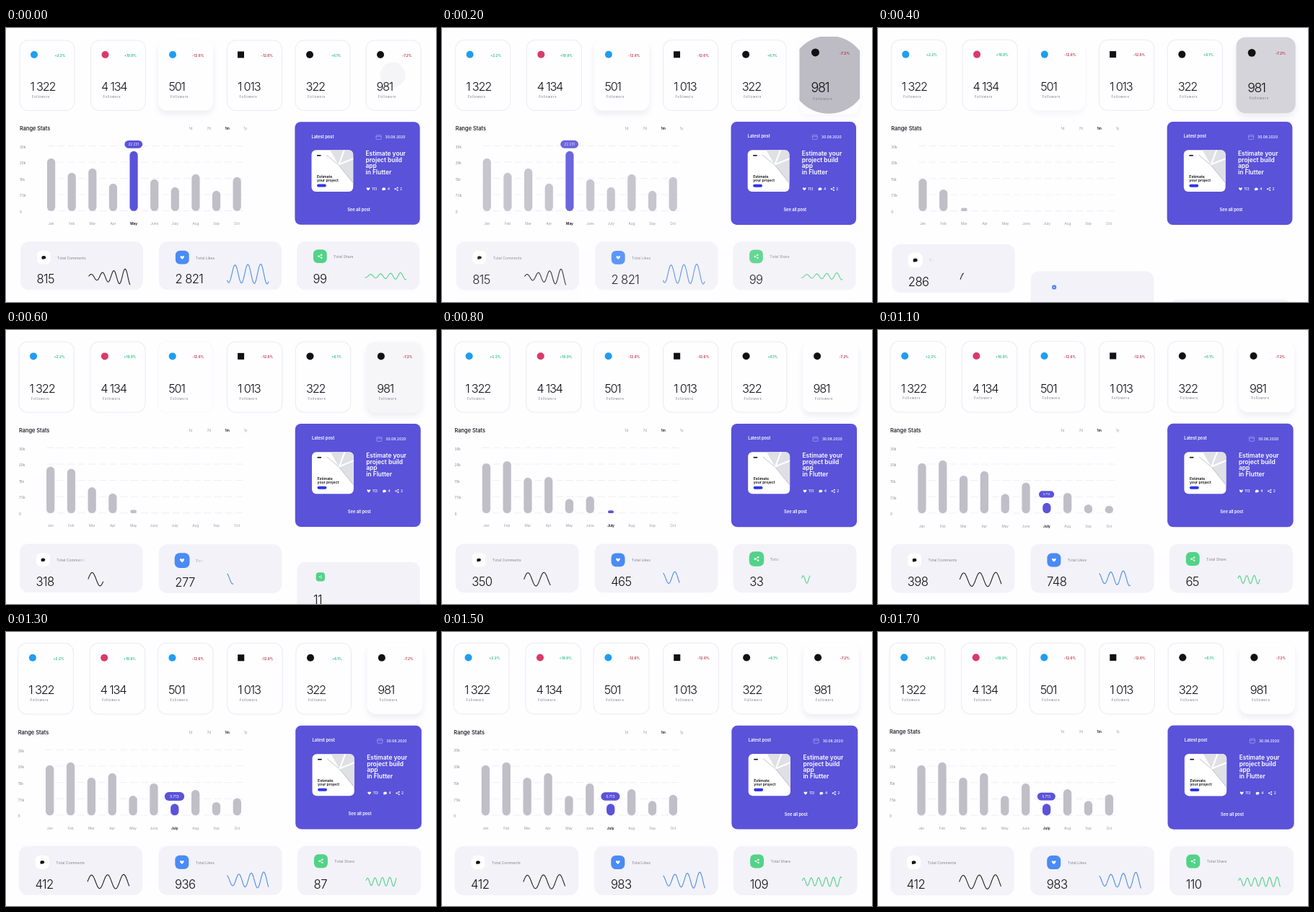
Recreate the animation shown at these times as an HTML page with a canvas. Size 596 px wide and 380 px high, loop 1800 ms.

```html
<!DOCTYPE html>
<html lang="en">
<head>
<meta charset="utf-8">
<title>Dashboard</title>
<style>
html, body { margin: 0; width: 100%; height: 100%; overflow: hidden; background: #fefdff; }
canvas { display: block; width: 596px; height: 380px; }
</style>
</head>
<body>
<canvas id="stage"></canvas>
<script>
const canvas = document.getElementById('stage');
const ctx = canvas.getContext('2d');
const dpr = window.devicePixelRatio || 1;
canvas.width = 596 * dpr;
canvas.height = 380 * dpr;

const LOOP = 1800, STEP = 100;
const BG = '#fefdff', VIOLET = '#5a52d9', GREY = '#9b9aa3', INK = '#111114';
const GREEN = '#1fbf75', RED = '#b3313a', BLUE = '#1f9df0';
const MONTHS = ['Jan', 'Feb', 'Mar', 'Apr', 'May', 'June', 'July', 'Aug', 'Sep', 'Oct'];

const CARDS = [
  { x: 19, value: '1 322', change: '+2.2%', color: BLUE },
  { x: 117.5, value: '4 134', change: '+19.9%', color: '#d93a6a' },
  { x: 211, value: '501', change: '-12.6%', color: BLUE },
  { x: 306.5, value: '1 013', change: '-12.6%', color: INK, square: true },
  { x: 401, value: '322', change: '+6.1%', color: INK },
  { x: 499, value: '981', change: '-7.2%', color: INK },
];

// Sparklines are sine waves whose amplitude grows from left to right.
const wave = (cycles, phase, mid, amp, growth) => u =>
  mid - (amp + growth * u) * Math.sin(2 * Math.PI * (cycles * u + phase));

const BEFORE = {
  active: 4, tip: '22 231', tipY: 161.3,
  bars: [73, 53, 59, 38, 83, 44, 33, 51, 28, 47],
  waves: [wave(3.7, 0.03, 49, 3, 9), wave(3.27, -0.37, 45, 12, 2), wave(4.2, -0.32, 48, 2, 3)],
};
const AFTER = {
  active: 6, tip: '5.713', tipY: 227.7,
  bars: [69, 73, 52, 58, 27, 44, 16, 36, 20, 29],
  waves: [wave(2.63, 0, 49, 9, 1), wave(3.4, 0.31, 47, 7, 5), wave(5.7, 0.05, 49, 5, 2)],
};
const PANELS = [
  { x: 20, label: 'Total Comments', color: '#fff', stroke: '#222', icon: bubble, iconColor: INK,
    dy: 0, before: '815', total: 412, rate: 0.16, done: 1187 },
  { x: 212, label: 'Total Likes', color: '#4a8bf5', stroke: '#4a8fe8', icon: heart, iconColor: '#fff',
    dy: 0, before: '2 821', total: 983, rate: 0.942, done: 1349.5 },
  { x: 403, label: 'Total Share', color: '#52d388', stroke: '#52d388', icon: share, iconColor: '#fff',
    dy: -1.5, before: '99', total: 110, rate: 0.1085, done: 1512 },
];

const ramp = (t, from, to) => Math.max(0, Math.min(1, (t - from) / (to - from)));
const easeOut = u => 1 - (1 - u) ** 3;
const easeOutBack = u => 1 + 2.7 * (u - 1) ** 3 + 1.7 * (u - 1) ** 2;

function group(alpha, draw) {
  if (alpha <= 0) return;
  ctx.save();
  ctx.globalAlpha *= alpha;
  draw();
  ctx.restore();
}

function scaled(x, y, s, draw) {
  if (s <= 0) return;
  ctx.save();
  ctx.translate(x, y);
  ctx.scale(s, s);
  ctx.translate(-x, -y);
  draw();
  ctx.restore();
}

function box(x, y, w, h, r, color) {
  ctx.beginPath();
  ctx.roundRect(x, y, w, h, Math.min(r, w / 2, h / 2));
  if (color) { ctx.fillStyle = color; ctx.fill(); }
}

function disc(x, y, r, color) {
  ctx.beginPath();
  ctx.arc(x, y, r, 0, 7);
  ctx.fillStyle = color;
  ctx.fill();
}

function stroke(color, width) {
  ctx.strokeStyle = color;
  ctx.lineWidth = width;
  ctx.stroke();
}

function line(points, color, width) {
  ctx.beginPath();
  for (let i = 0; i < points.length; i += 2) ctx.lineTo(points[i], points[i + 1]);
  stroke(color, width);
}

function text(s, x, y, size, color, weight = 400, align = 'left', spacing = 0) {
  ctx.font = `${weight} ${size}px Inter, sans-serif`;
  ctx.letterSpacing = spacing + 'px';
  ctx.textAlign = align;
  ctx.fillStyle = color;
  ctx.fillText(s, x, y);
}

function heart(x, y, color) {
  ctx.beginPath();
  ctx.moveTo(x, y + 2.5);
  ctx.bezierCurveTo(x - 5, y - 1, x - 2, y - 4, x, y - 1.2);
  ctx.bezierCurveTo(x + 2, y - 4, x + 5, y - 1, x, y + 2.5);
  ctx.fillStyle = color;
  ctx.fill();
}

function bubble(x, y, color) {
  ctx.beginPath();
  ctx.ellipse(x, y, 2.8, 2.2, 0, 0, 7);
  ctx.fillStyle = color;
  ctx.fill();
  ctx.fillRect(x - 2.5, y + 0.8, 1.7, 1.6);
}

function share(x, y, color) {
  line([x + 2, y - 2, x - 2, y, x + 2, y + 2], color, 0.7);
  for (const [dx, dy] of [[2, -2], [-2, 0], [2, 2]]) disc(x + dx, y + dy, 1.1, color);
}

// The third card loses the pointer while the last one is tapped and lifted.
function cardState(i, t) {
  if (i === 2) return { lift: 1 - ramp(t, 200, 600), border: ramp(t, 400, 1000), size: 1, tint: 0 };
  if (i < 5) return { lift: 0, border: 1, size: 1, tint: 0 };
  return {
    lift: ramp(t, 100, 400),
    border: 1 - ramp(t, 100, 200),
    size: 1 + 0.1 * ramp(t, 0, 200) * (1 - ramp(t, 350, 600)),
    tint: (0.13 + 0.79 * ramp(t, 0, 200)) * (1 - ramp(t, 250, 650)),
  };
}

function drawCard(card, state, t) {
  const { x } = card, y = 17, w = 76, h = 97.5;
  scaled(x + w / 2, 65.5, state.size, () => {
    group(state.lift, () => {
      ctx.shadowColor = 'rgba(40,35,70,.08)';
      ctx.shadowBlur = 8 * dpr;
      ctx.shadowOffsetY = 5 * dpr;
      box(x, y, w, h, 12, BG);
    });
    box(x, y, w, h, 12, BG);
    group(state.tint, () => {
      box(x, y, w, h, 12);
      ctx.clip();
      disc(536, 65, 17.5 + 0.158 * t, '#b8b7bf');
    });
    group(state.border, () => {
      box(x, y, w, h, 12);
      stroke('#ebeaf1', 1);
    });
    if (card.square) box(x + 14.5, 32.5, 9, 9, 0, card.color);
    else disc(x + 20, 37, 5, card.color);
    text(card.change, x + 63.5, 39.8, 4.7, card.change[0] === '+' ? GREEN : RED, 600, 'right');
    text(card.value, x + 14.5, 87.3, 16.3, INK, 300, 'left', -1.2);
    text('Followers', x + 17, 97, 4.4, '#77767f', 400, 'left', 0.55);
  });
}

const monthX = i => 62.6 + 28.62 * i;

function drawChartFrame(active) {
  text('Range Stats', 19, 142, 7.4, INK, 500);
  ['1d', '7d', '1m', '1y'].forEach((s, i) => {
    const on = s === '1m';
    text(s, 256 + 25.3 * i, 141, 4.8, on ? INK : GREY, on ? 600 : 400, 'center');
  });
  ['30k', '20k', '15k', '7.5k', '0'].forEach((s, i) => {
    const y = 163.5 + 22.5 * i;
    text(s, 19, y + 3.2, 4.6, '#85848d');
    ctx.setLineDash([10, 4.5]);
    line([57, y, 331, y], '#ecebf0', 0.8);
    ctx.setLineDash([]);
  });
  MONTHS.forEach((s, i) => {
    const on = i === active;
    text(s, monthX(i), 273, 4.7, on ? INK : GREY, on ? 600 : 400, 'center');
  });
}

function drawBars(data, growth, tipSize) {
  data.bars.forEach((full, i) => {
    const h = full * growth(i);
    const w = Math.min(11.2, h + 4);
    if (h > 0.3) box(monthX(i) - w / 2, 253.8 - h, w, h, 5.6, i === data.active ? VIOLET : '#c0bfc8');
  });
  const x = monthX(data.active) - 0.3;
  scaled(x, data.tipY, tipSize, () => {
    box(x - 12.4, data.tipY - 5.4, 24.8, 10.8, 5.4, VIOLET);
    text(data.tip, x, data.tipY + 1.7, 4.7, '#fff', 400, 'center');
  });
}

function drawPanel(panel, value, curve, state) {
  const { x, dy } = panel, y = 296 + state.offset;
  box(x, y, 170, 67.3, 12, '#f3f2f8');

  const cx = x + 32.3, cy = y + 22.2 + dy;
  scaled(cx, cy, state.icon, () => {
    box(cx - 9.4, cy - 9.4, 18.8, 18.8, 6.2, panel.color);
    panel.icon(cx, cy, panel.iconColor);
  });

  let pen = x + 51;
  [...panel.label].forEach((c, i) => {
    group(ramp(state.chars, i, i + 4), () => text(c, pen, y + 24.5 + dy, 5.1, '#85848d'));
    ctx.font = '400 5.1px Inter, sans-serif';
    ctx.letterSpacing = '0px';
    pen += ctx.measureText(c).width;
  });
  text(value, x + 22.5, y + 58.3, 16.6, INK, 300, 'left', -0.6);

  if (state.line <= 0) return;
  ctx.beginPath();
  for (let u = 0; u <= state.line; u += 0.01) ctx.lineTo(x + 94.5 + 58 * u, y + curve(u));
  stroke(panel.stroke, 1.1);
}

function drawPost() {
  box(400.4, 130.2, 173.3, 142.6, 8, VIOLET);
  text('Latest post', 423.5, 152.5, 5.8, '#fff', 600);
  box(513, 148.5, 7, 6, 1);
  stroke('#c9c5fa', 0.5);
  line([513, 150.5, 520, 150.5], '#c9c5fa', 0.5);
  text('30.08.2020', 525.5, 153.2, 5, '#fff', 500);

  ctx.save();
  box(423.5, 169.3, 57.7, 57.7, 6, '#fff');
  ctx.clip();
  ctx.beginPath();
  for (const p of [[449, 169], [482, 169], [482, 216], [461, 190]]) ctx.lineTo(...p);
  ctx.fillStyle = '#dfe0e6';
  ctx.fill();
  line([444, 176, 461, 190, 482, 216], '#b4b5bd', 0.8);
  line([461, 190, 469, 169], '#fff', 2);
  line([462, 189, 482, 181], '#fff', 2);
  ctx.restore();
  box(431, 176, 5.5, 1.6, 0, INK);
  text('Estimate', 431, 207.7, 5.1, INK, 600);
  text('your project', 431, 212.8, 5.1, INK, 600);
  box(431, 216.6, 12.8, 4, 2, '#2f35f0');

  ['Estimate your', 'project build', 'app', 'in Flutter'].forEach((s, i) =>
    text(s, 498.5, 177.3 + 8.4 * i, 8.4, '#fff', 600));
  [[heart, 502, '113'], [bubble, 523.7, '4'], [share, 541, '2']].forEach(([icon, x, count]) => {
    scaled(x, 223.2, 0.85, () => icon(x, 223.2, '#fff'));
    text(count, x + 5, 225.1, 4.9, '#fff', 500);
  });
  text('See all post', 489, 253.9, 5.7, '#fff', 600, 'center');
}

const SETTLED = { offset: 0, icon: 1, chars: 99, line: 1 };

function entering(i, t) {
  const age = t - (172 + 158 * i);
  const lineStart = 340 + 130 * i;
  return {
    offset: 80 * (1 - easeOut(ramp(age, 0, 350))),
    icon: easeOutBack(ramp(age, 40, 440)),
    chars: (PANELS[i].label.length + 4) * ramp(age, 200, 500),
    line: ramp(t, lineStart, lineStart + 720 + 120 * i),
  };
}

const counter = (p, t) =>
  Math.max(0, Math.round(p.total - p.rate * Math.max(0, p.done - t)));

function draw(t) {
  ctx.setTransform(dpr, 0, 0, dpr, 0, 0);
  ctx.fillStyle = BG;
  ctx.fillRect(0, 0, 596, 380);

  scaled(298, 190, 1 + 0.0107 * t / 1700, () => {
    const fade = ramp(t, 100, 400) ** 2;
    CARDS.forEach((card, i) => drawCard(card, cardState(i, t), t));
    drawChartFrame(t < 300 ? BEFORE.active : t > 740 ? AFTER.active : -1);
    drawPost();

    group(1 - fade, () => {
      drawBars(BEFORE, () => 1, 1);
      PANELS.forEach((p, i) => drawPanel(p, p.before, BEFORE.waves[i], SETTLED));
    });
    group(fade, () => {
      drawBars(AFTER, i => easeOut(ramp(t, 200 + 90 * i, 880 + 90 * i)), easeOutBack(ramp(t, 900, 1650)));
      PANELS.forEach((p, i) => drawPanel(p, counter(p, t), AFTER.waves[i], entering(i, t)));
    });
  });
}

function frame() {
  draw(Math.floor(performance.now() % LOOP / STEP) * STEP);
  requestAnimationFrame(frame);
}
frame();
</script>
</body>
</html>
```
